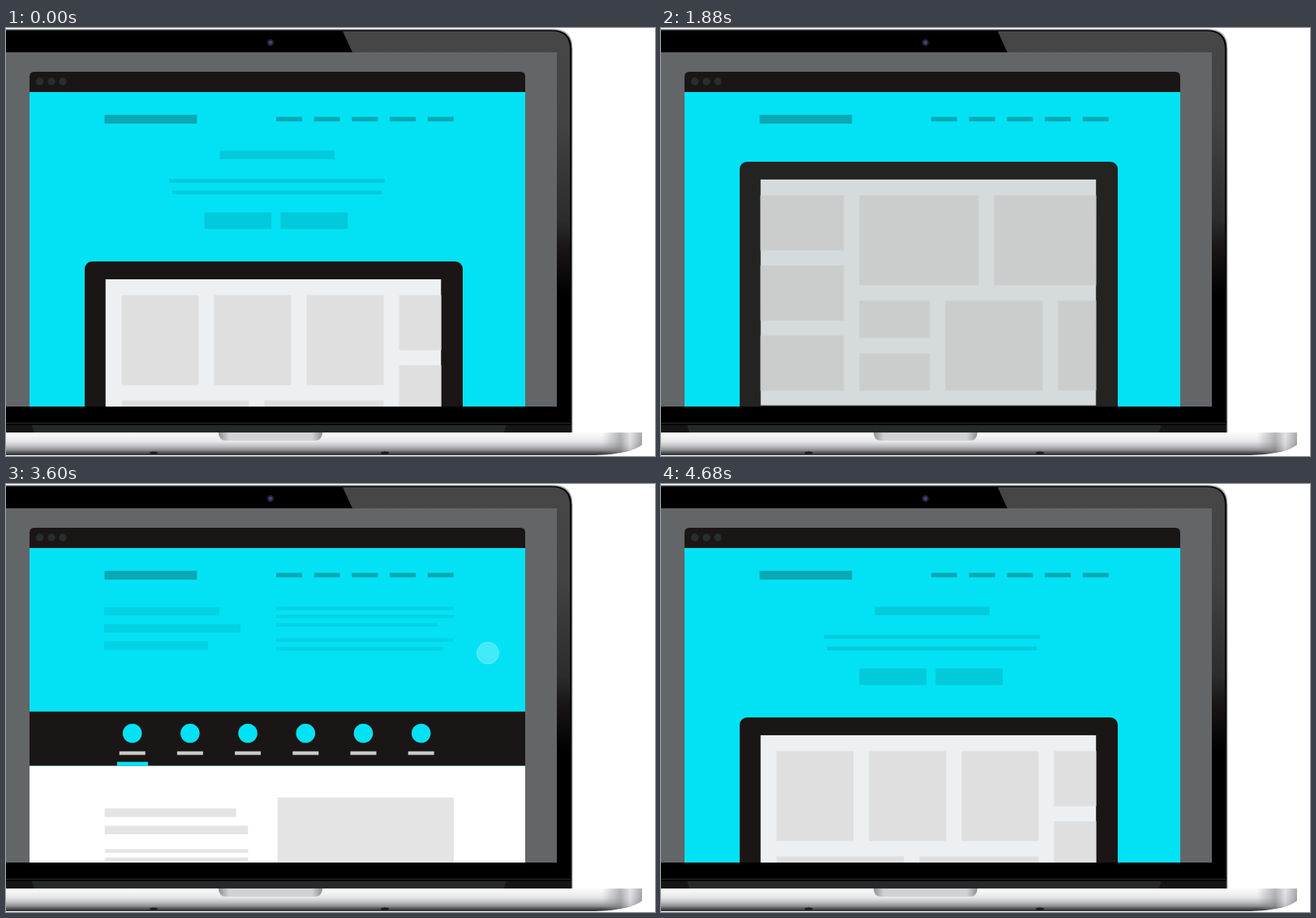
Recreate the animation shown at these times as an HTML page. Size 800 px wide and 528 px high, loop 5 s.

```html
<!DOCTYPE html>
<html lang="en">
<head>
<meta charset="utf-8">
<title>Laptop page scroll</title>
<style>
  html, body { margin: 0; width: 100%; height: 100%; overflow: hidden; background: #fff; }
  svg { position: absolute; left: 0; top: 0; display: block; }
  #view { position: absolute; left: 0; top: 0; width: 800px; height: 528px; clip-path: inset(79px 160px 61px 29px); background: #03e2f4; }
  #tablet { left: 97px; transform-origin: 50% 0; }
</style>
</head>
<body>
<svg width="800" height="528">
  <defs>
    <linearGradient id="gloss" gradientUnits="userSpaceOnUse" x1="0" y1="0" x2="0" y2="330">
      <stop stop-color="#464646"/><stop offset=".35" stop-color="#424343"/>
      <stop offset=".72" stop-color="#2a2c2d"/><stop offset=".82" stop-color="#1a1615"/><stop offset="1"/>
    </linearGradient>
    <linearGradient id="base" x2="0" y2="1">
      <stop stop-color="#fdfdfd"/><stop offset=".4" stop-color="#e6e6e8"/><stop offset=".6" stop-color="#c0c1c4"/>
      <stop offset=".78" stop-color="#8d8e92"/><stop offset=".88" stop-color="#55565a"/><stop offset="1" stop-color="#2c2d30"/>
    </linearGradient>
    <linearGradient id="tip" x2="1">
      <stop stop-color="#85868b" stop-opacity="0"/><stop offset=".45" stop-color="#85868b" stop-opacity=".6"/>
      <stop offset=".7" stop-color="#dcdcdf" stop-opacity=".7"/><stop offset="1" stop-color="#85868b" stop-opacity=".7"/>
    </linearGradient>
    <linearGradient id="notch" x2="1">
      <stop stop-color="#8e8f92"/><stop offset=".1" stop-color="#d2d2d4"/>
      <stop offset=".9" stop-color="#d2d2d4"/><stop offset="1" stop-color="#8e8f92"/>
    </linearGradient>
  </defs>
  <path d="M0 1H674Q698.5 1 698.5 25V499H0Z" fill="#a9aaac"/>
  <path d="M0 2.5H673Q697.3 2.5 697.3 26V499H0Z"/>
  <path d="M415 4H673Q695 4 695 26V467H679V30H427Z" fill="url(#gloss)"/>
  <path d="M0 487.5H696" stroke="#2b2d2f"/>
  <path d="M0 490H697V499H0Z" fill="#151616"/>
  <path d="M32 490H617L614 499H35Z" fill="#25292a"/>
  <circle cx="326" cy="18" r="4.3" fill="#24222e"/>
  <circle cx="326" cy="18" r="2.2" fill="#4a3f86"/>
  <path d="M0 30H679V467H0Z" fill="#636669"/>
  <path d="M29 79V60Q29 54 35 54H634Q640 54 640 60V79Z" fill="#1a1615"/>
  <g fill="#262f2f"><circle cx="41.7" cy="66" r="4.7"/><circle cx="56" cy="66" r="4.7"/><circle cx="70" cy="66" r="4.7"/></g>
  <path d="M0 499H784V514C776 521 752 527 726 527H0Z" fill="url(#base)"/>
  <path d="M735 499H784V514C776 521 752 526 735 526Z" fill="url(#tip)"/>
  <path d="M262 499H390Q390 509 380 509H272Q262 509 262 499Z" fill="url(#notch)"/>
  <ellipse cx="182" cy="524" rx="5" ry="1.5" fill="#17181a"/>
  <ellipse cx="467" cy="524" rx="5" ry="1.5" fill="#17181a"/>
</svg>
<div id="view">
  <svg width="800" height="528">
    <g id="nav" fill="#09a8b5"></g>
    <g id="hero" fill="#02cadb"></g>
    <g id="intro" fill="#02cadb"></g>
  </svg>
  <svg id="tablet" width="466" height="323">
    <rect width="466" height="323" rx="9" fill="#1a1615"/>
    <svg x="25.5" y="22" width="414" height="279">
      <rect width="414" height="279" fill="#ecf0f3"/>
      <g id="gallery" fill="#dfdfdf"></g>
    </svg>
    <rect id="shade" width="466" height="323" rx="9" fill="#506462"/>
  </svg>
  <svg width="800" height="528">
    <g id="article">
      <path d="M29 241H641V308H29Z" fill="#1a1615"/>
      <path d="M29 308H641V820H29Z" fill="#fff"/>
      <g id="icons" fill="#03e2f4"></g>
      <g id="labels" fill="#c9c8c7"></g>
      <g id="copy" fill="#e4e4e4"></g>
    </g>
    <circle id="dot" cx="594" r="13.5" fill="#fff" fill-opacity=".5" stroke="#fff" stroke-opacity=".6"/>
  </svg>
</div>
<script>
const $ = id => document.getElementById(id);
const add = (id, name, attrs) => {
  const el = document.createElementNS('http://www.w3.org/2000/svg', name);
  for (const key in attrs) el.setAttribute(key, attrs[key]);
  $(id).append(el);
};
const rect = (id, x, y, width, height) => add(id, 'rect', { x, y, width, height });

// Page header and the two sets of hero text
rect('nav', 121.5, 107, 114, 11);
rect('hero', 263.5, 151.3, 141.5, 10.5);
rect('hero', 201, 186.2, 266, 4.6);
rect('hero', 205, 200.6, 258, 4.6);
for (const x of [244.5, 338.5]) rect('hero', x, 227.5, 82.8, 20.5);
[142, 168, 128].forEach((w, i) => rect('intro', 121, 151.7 + i * 21.2, w, 10.6));
[[151, 219], [161, 219], [171.5, 199], [190.3, 219], [200.8, 206]].forEach(([y, w]) => rect('intro', 333, y, w, 4.5));

// Icon row and article
for (let i = 0; i < 6; i++) {
  if (i < 5) rect('nav', 333 + i * 46.7, 109.6, 32, 5.6);
  add('icons', 'circle', { cx: 155.7 + i * 71.2, cy: 267.8, r: 11.8 });
  rect('labels', 139.7 + i * 71.2, 290, 32, 4.5);
  if (i < 5) rect('copy', 121.7, 410.7 + i * 10.35, i < 4 ? 176.7 : 158, 4.3);
}
rect('icons', 137, 303, 38, 5);
rect('copy', 121.7, 360.5, 162, 10.5);
rect('copy', 121.7, 381.8, 176.7, 10.5);
rect('copy', 334.7, 347, 217.3, 146);

// Gallery tiles: x, width, then the row pattern
const rows = {
  top: [[19.5, 111]], low: [[149.5, 111]],
  three: [[19.5, 68], [106, 68], [192.7, 68]],
  pair: [[149.5, 46], [214.7, 46]]
};
[[20, 95, 'top'], [134, 95, 'top'], [248, 95, 'top'], [20, 157, 'low'], [196, 147, 'low'],
 [362, 120, 'three'], [501, 147, 'top'], [501, 87, 'pair'], [607, 120, 'low'],
 [667, 147, 'top'], [746, 147, 'low'], [833, 120, 'top'], [912, 120, 'low']]
  .forEach(([x, w, kind]) => rows[kind].forEach(([y, h]) => rect('gallery', x, y, w, h)));

const span = (t, from, to) => Math.min(1, Math.max(0, (t - from) / (to - from)));
const ease = u => u < .5 ? 2 * u * u : 1 - 2 * (1 - u) ** 2;
const move = (t, from, to) => ease(span(t, from, to));

function touch(t, start, y, travel) {
  const age = t - start;
  if (age < 0 || age > 480) return false;
  $('dot').setAttribute('cy', y + travel * move(age, 254, 794));
  $('dot').setAttribute('r', 20.5 - 7 * span(age, 0, 160));
  $('dot').style.opacity = span(age, -40, 160) * (1 - span(age, 320, 480));
  return true;
}

function draw(t) {
  const back = t >= 3900;

  const heroShown = back ? move(t, 4330, 4690) : 1 - span(t, 1460, 1760);
  $('hero').style.opacity = heroShown;
  $('hero').setAttribute('transform', `translate(0 ${-3 * (1 - heroShown)})`);
  $('intro').style.opacity = span(t, 2080, 2420) * (1 - span(t, 3450, 3860));

  // The tablet slides up and folds away, later unfolds on its way down
  const open = back ? move(t, 3990, 4690) : 1 - move(t, 1840, 2260);
  const raised = back ? 1 - open : move(t, 1494, 2034);
  const fold = back ? 1 - span(t, 3990, 4500) : span(t, 1840, 2260);
  $('tablet').style.display = open > .001 ? 'block' : 'none';
  $('tablet').style.transform =
    `translateY(${288 - 147 * raised}px) perspective(14000px) rotateX(${-90 * (1 - open)}deg)`;
  $('tablet').style.opacity = 1 - .3 * fold ** 4;
  $('shade').style.opacity = 1 - (1 - fold) ** 1.6;
  const scroll = back ? 0 : Math.max(0, t - 120) * .2153;
  $('gallery').setAttribute('transform', `translate(${-scroll} 0)`);

  const drop = t < 3000 ? 1 - move(t, 1900, 2440) : move(t, 3454, 3994);
  $('article').setAttribute('transform', `translate(0 ${272 * drop})`);

  const touching = touch(t, 1240, 400, -110) || touch(t, 3200, 180, 195);
  $('dot').style.display = touching ? 'block' : 'none';
}

const begin = performance.now();
function tick() {
  const t = (performance.now() - begin) % 5000;
  draw(Math.floor(t / 40) * 40);
  requestAnimationFrame(tick);
}
tick();
</script>
</body>
</html>
```
